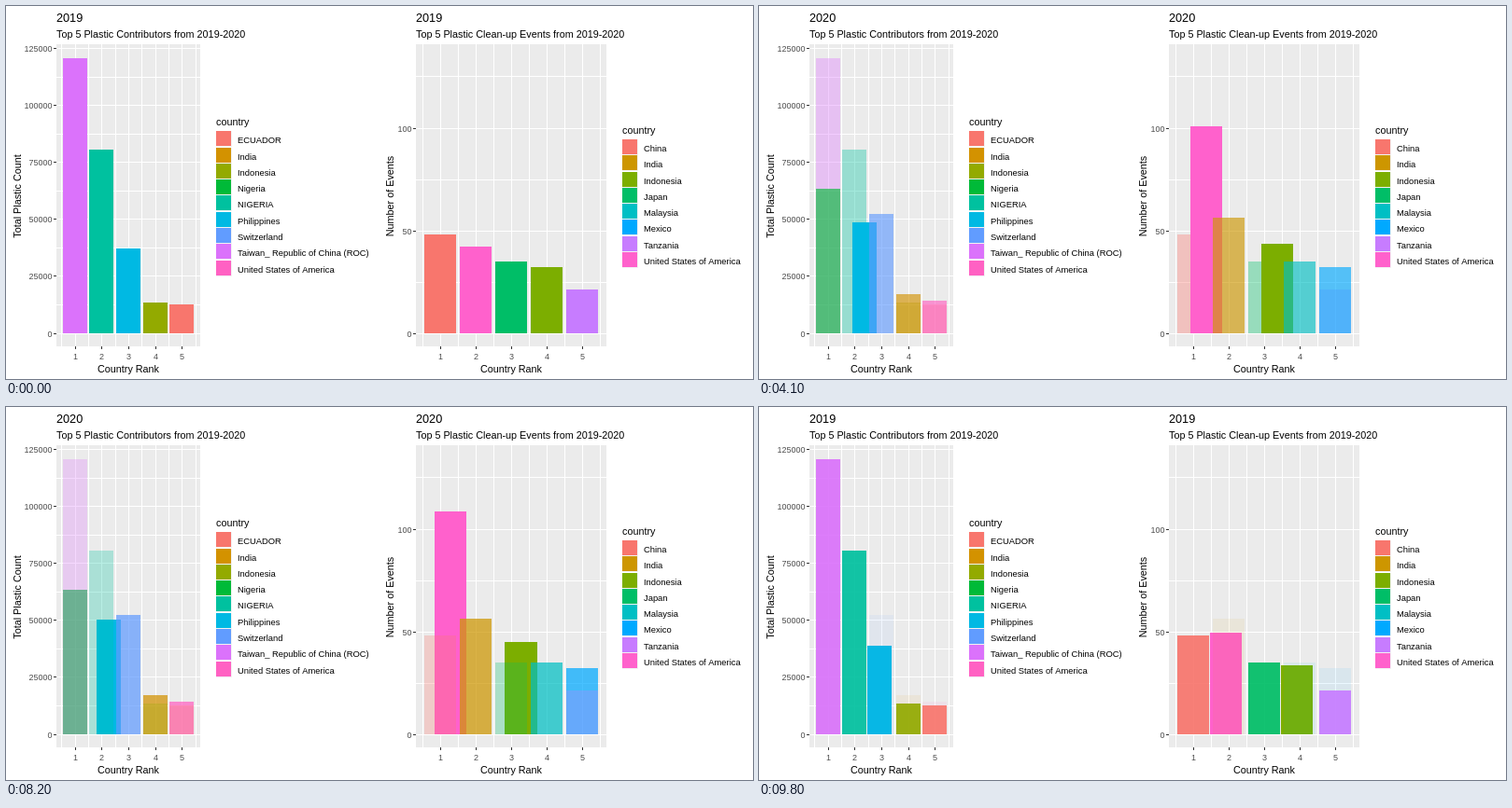
Recreate the animation shown at these times as an HTML page with a canvas. Size 800 by 400 pixels, loop 9900 ms.

```html
<!DOCTYPE html>
<html lang="en">
<head>
<meta charset="utf-8">
<title>Plastic by year</title>
<style>
  html, body { margin: 0; width: 100%; height: 100%; overflow: hidden; background: #fff; }
  canvas { display: block; width: 800px; height: 400px; }
</style>
</head>
<body>
<canvas id="stage" width="800" height="400"></canvas>
<script>
const ctx = document.getElementById('stage').getContext('2d');
const LOOP = 9900, TICK = 100, STEPS = 25;
const TOP = 41, BOTTOM = 365, ZERO = 350.62;
const FONT = '"Liberation Sans", Arial, sans-serif';

// Each year lists [country, value] in rank order.
const charts = [
  {
    x: 54, width: 154, bar: 60.8, unit: 28.65, barWidth: 25.8,
    subtitle: 'Top 5 Plastic Contributors from 2019-2020',
    yTitle: 'Total Plastic Count', yTitleX: 16,
    perUnit: 61.13 / 25000, major: 25000, max: 125000,
    legendX: 225, legendY: 134.3,
    colors: {
      'ECUADOR': '#F8766D', 'India': '#D39200', 'Indonesia': '#93AA00',
      'Nigeria': '#00BA38', 'NIGERIA': '#00C19F', 'Philippines': '#00B9E3',
      'Switzerland': '#619CFF', 'Taiwan_ Republic of China (ROC)': '#DB72FB',
      'United States of America': '#FF61C3'
    },
    years: [
      [['Taiwan_ Republic of China (ROC)', 120600], ['NIGERIA', 80500],
       ['Philippines', 37100], ['Indonesia', 13400], ['ECUADOR', 12600]],
      [['Nigeria', 63300], ['Philippines', 55200], ['Switzerland', 52300],
       ['India', 17100], ['United States of America', 14200]]
    ]
  },
  {
    x: 439, width: 204, bar: 447.95, unit: 37.95, barWidth: 34.1,
    subtitle: 'Top 5 Plastic Clean-up Events from 2019-2020',
    yTitle: 'Number of Events', yTitleX: 415,
    perUnit: 2.201, major: 50, max: 125,
    legendX: 660, legendY: 143,
    colors: {
      'China': '#F8766D', 'India': '#CD9600', 'Indonesia': '#7CAE00',
      'Japan': '#00BE67', 'Malaysia': '#00BFC4', 'Mexico': '#00A9FF',
      'Tanzania': '#C77CFF', 'United States of America': '#FF61CC'
    },
    years: [
      [['China', 48], ['United States of America', 42], ['Japan', 35],
       ['Indonesia', 32], ['Tanzania', 21]],
      [['United States of America', 134], ['India', 56], ['Indonesia', 50],
       ['Malaysia', 35], ['Mexico', 32]]
    ]
  }
];

const mix = (a, b, p) => a + (b - a) * p;

function box(x0, y0, x1, y1, color) {
  const x = Math.round(x0), y = Math.round(y0);
  ctx.fillStyle = color;
  ctx.fillRect(x, y, Math.round(x1) - x, Math.round(y1) - y);
}

function text(str, x, y, size, color = '#000', align = 'left') {
  ctx.font = `${size}px ${FONT}`;
  ctx.fillStyle = color;
  ctx.textAlign = align;
  ctx.fillText(str, x, y);
}

function drawGrid(c) {
  const right = c.x + c.width;
  box(c.x, TOP, right, BOTTOM, '#EBEBEB');
  for (let v = 0; v <= c.max; v += c.major / 2) {
    const y = Math.round(ZERO - v * c.perUnit);
    box(c.x, y, right, y + 1, '#fff');
    if (v % c.major) continue;
    box(c.x - 3, y, c.x, y + 1, '#333');
    text(String(v), c.x - 4.5, y + 4, 9, '#4D4D4D', 'right');
  }
  for (let rank = 0.5; rank <= 5.5; rank += 0.5) {
    const x = Math.round(c.bar + c.barWidth / 2 + (rank - 1) * c.unit);
    box(x, TOP, x + 1, BOTTOM, '#fff');
    if (rank % 1) continue;
    box(x, BOTTOM, x + 1, BOTTOM + 3, '#333');
    text(String(rank), x + 0.5, 379, 9, '#4D4D4D', 'center');
  }
}

function drawBar(c, name, rank, value, alpha) {
  const x = c.bar + (rank - 1) * c.unit;
  ctx.globalAlpha = alpha;
  box(x, ZERO - value * c.perUnit, x + c.barWidth, ZERO, c.colors[name]);
  ctx.globalAlpha = 1;
}

// Shared countries slide, leaving ones fade out, entering ones fade in on top.
function drawBars(c, from, p) {
  const start = c.years[from], end = c.years[1 - from];
  start.forEach(([name, value], i) => {
    const j = end.findIndex(([other]) => other === name);
    if (j < 0) drawBar(c, name, i + 1, value, 1 - p);
    else drawBar(c, name, mix(i, j, p) + 1, mix(value, end[j][1], p), 1);
  });
  end.forEach(([name, value], i) => {
    if (!start.some(([other]) => other === name)) drawBar(c, name, i + 1, value, p);
  });
}

function drawLegend(c) {
  text('country', c.legendX, c.legendY - 6.3, 10.8);
  Object.entries(c.colors).forEach(([name, color], i) => {
    const y = Math.round(c.legendY + i * 17.28);
    box(c.legendX, y, c.legendX + 17, y + 17, '#F2F2F2');
    box(c.legendX, y, c.legendX + 16, y + 16, color);
    text(name, c.legendX + 23, y + 12.5, 9.4);
  });
}

function drawTitles(c, year) {
  text(year, c.x, 17, 12.7);
  text(c.subtitle, c.x, 34, 10.8);
  text('Country Rank', c.x + c.width / 2, 393, 10.8, '#000', 'center');
  ctx.save();
  ctx.translate(c.yTitleX, 204);
  ctx.rotate(-Math.PI / 2);
  text(c.yTitle, 0, 0, 10.8, '#000', 'center');
  ctx.restore();
}

function draw(ms) {
  const tick = Math.floor((ms % LOOP) / TICK);
  const from = tick < 50 ? 0 : 1;
  const step = Math.max(0, tick - 50 * from - 25);
  const year = step > 13 ? 2020 - from : 2019 + from;
  box(0, 0, 800, 400, '#fff');
  for (const c of charts) {
    drawGrid(c);
    drawBars(c, from, step / STEPS);
    drawLegend(c);
    drawTitles(c, String(year));
  }
}

function loop() {
  draw(performance.now());
  requestAnimationFrame(loop);
}
loop();
</script>
</body>
</html>
```
